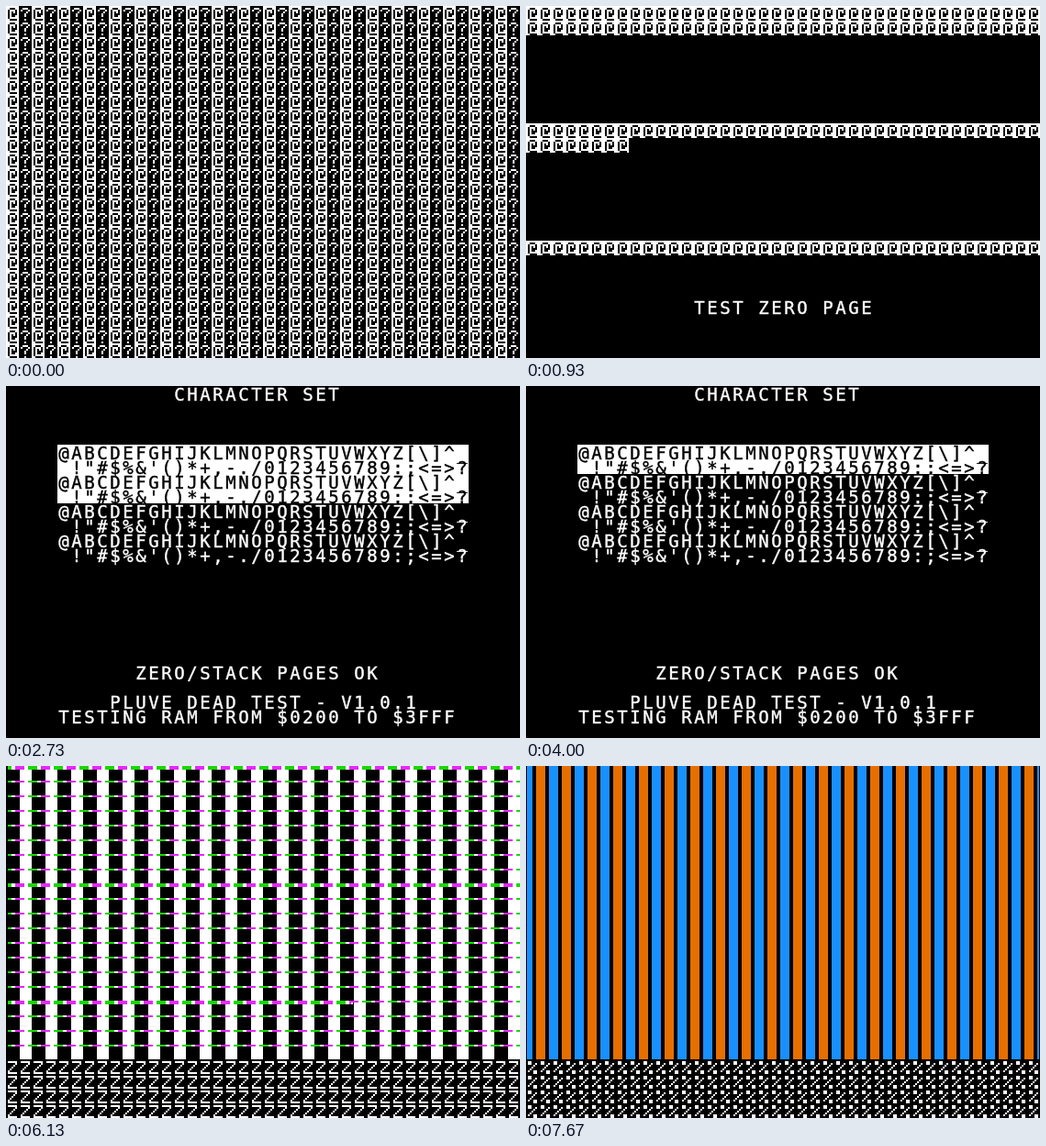
An HTML page with a canvas for the animation above (8000 ms loop, 560 by 384 pixels).

```html
<!DOCTYPE html>
<html lang="en">
<head>
<meta charset="utf-8">
<title>RAM test</title>
<style>
  html, body { margin: 0; width: 100%; height: 100%; overflow: hidden; background: #000; }
  #stage { position: relative; width: 560px; height: 384px; overflow: hidden; background: #000; }
  canvas { position: absolute; left: 0; top: 0; }
  .line {
    position: absolute; box-sizing: border-box; height: 16px;
    padding: 1px 0 0 1.3px;
    font: 19px/16px "DejaVu Sans Mono", monospace;
    letter-spacing: calc(14px - 1ch);
    -webkit-text-stroke: 0.4px currentColor;
    white-space: pre; color: #fff;
  }
  .inv { color: #000; }
</style>
</head>
<body>
<div id="stage"><canvas id="view" width="560" height="384"></canvas></div>
<script>
const LOOP = 8000, TICK = 1000 / 15;
const CHARSET = 15, GRAPHICS = 90;   // ticks at which the screens switch
const stage = document.getElementById('stage');
const ctx = document.getElementById('view').getContext('2d');

// Characters that show up as raw memory, on a 7 x 8 cell
const glyphs = {
  0x00: 'M2 1.5h3M1 2.5h1m3 0h1M1 3.5h1m1 0h1m1 0h1M1 4.5h1m1 0h3M1 5.5h1m1 0h2M1 6.5h1M2 7.5h4',
  0x5A: 'M1 1.5h5M5 2.5h1M4 3.5h1M3 4.5h1M2 5.5h1M1 6.5h1M1 7.5h5',
  0xA5: 'M1 1.5h2M1 2.5h2m2 0h1M4 3.5h1M3 4.5h1M2 5.5h1M1 6.5h1m2 0h2M4 7.5h2',
  0xFF: 'M2 1.5h3M1 2.5h1m3 0h1M4 3.5h1M3 4.5h1M3 5.5h1M3 7.5h1'
};
for (const code in glyphs) glyphs[code] = new Path2D(glyphs[code]);

const lines = [];
function addLine(row, col, text, from, to, style) {
  const el = document.createElement('div');
  el.className = 'line';
  el.textContent = text;
  el.style.left = col * 14 + 'px';
  el.style.top = row * 16 + 'px';
  stage.append(el);
  lines.push({ el, row, col, size: text.length, from, to, style });
}

const chars = (first) => String.fromCharCode(...Array.from({ length: 32 }, (_, i) => first + i));
addLine(20, 13, 'TEST ZERO PAGE', 1, CHARSET);
addLine(0, 13, 'CHARACTER SET', CHARSET, GRAPHICS);
['inverse', 'flash', 'normal', 'normal'].forEach((style, i) => {
  addLine(4 + 2 * i, 4, chars(64), CHARSET, GRAPHICS, style);
  addLine(5 + 2 * i, 4, chars(32), CHARSET, GRAPHICS, style);
});
addLine(19, 10, 'ZERO/STACK PAGES OK', CHARSET, GRAPHICS);
addLine(21, 8, 'PLUVE DEAD TEST - V1.0.1', CHARSET, GRAPHICS + 1);
addLine(22, 4, 'TESTING RAM FROM $0200 TO $3FFF', CHARSET, GRAPHICS + 1);

const flashOn = (tick) => Math.floor((tick + 0.4 - CHARSET) / 3.75) % 2 === 1;
const textAddr = (row, col) => 0x400 + (row % 8) * 128 + (row >> 3) * 40 + col;
const hiresAddr = (y, col) =>
  0x2000 + (y % 8) * 1024 + ((y >> 3) % 8) * 128 + (y >> 6) * 40 + col;

// Two rising write passes over the power-up pattern
function peek(addr, tick) {
  if (addr < 8992 + (tick - 106) * 2667) return 0xA5;
  if (addr < 0x246B + (tick - 92) * 4167) return 0x5A;
  return addr & 1 ? 0xFF : 0;
}

function drawCell(value, row, col, flash) {
  const inverse = value < 0x40 || (value < 0x80 && flash);
  ctx.save();
  ctx.translate(col * 14, row * 16);
  ctx.scale(2, 2);
  ctx.fillStyle = inverse ? '#fff' : '#000';
  ctx.fillRect(0, 0, 7, 8);
  ctx.strokeStyle = inverse ? '#000' : '#fff';
  ctx.stroke(glyphs[value]);
  ctx.restore();
}

function drawText(firstRow, byteAt, flash) {
  for (let row = firstRow; row < 24; row++)
    for (let col = 0; col < 40; col++) {
      const value = byteAt(textAddr(row, col));
      if (value !== null) drawCell(value, row, col, flash);
    }
}

const hues = [['#e628ff', '#19d700'], ['#1990ff', '#e66f00']];

function drawHires(tick) {
  for (let y = 0; y < 160; y++) {
    const bytes = Array.from({ length: 40 }, (_, col) => peek(hiresAddr(y, col), tick));
    const bit = (x) => x < 0 || x > 279 ? 0 : (bytes[Math.floor(x / 7)] >> (x % 7)) & 1;
    for (let x = 0; x < 280; x++) {
      const high = bytes[Math.floor(x / 7)] >> 7;
      const left = bit(x - 1), right = bit(x + 1);
      let color = '#000';
      if (bit(x)) color = left || right ? '#fff' : hues[high][x % 2];
      else if (left && right) color = hues[high][(x + 1) % 2];
      ctx.fillStyle = color;
      ctx.fillRect(2 * x + high, 2 * y, 2, 2);
    }
  }
}

function showLines(tick, flash) {
  for (const { el, row, col, size, from, to, style } of lines) {
    const visible = tick >= from && tick < to;
    const inverse = style === 'inverse' || (style === 'flash' && flash);
    el.style.display = visible ? 'block' : 'none';
    el.classList.toggle('inv', inverse);
    if (visible && inverse) {
      ctx.fillStyle = '#fff';
      ctx.fillRect(col * 14, row * 16, size * 14, 16);
    }
  }
}

function draw(tick) {
  const flash = flashOn(tick);
  ctx.fillStyle = '#000';
  ctx.fillRect(0, 0, 560, 384);
  if (tick === 0) {
    drawText(0, (addr) => addr & 1 ? 0xFF : 0, false);
  } else if (tick < CHARSET) {
    const end = 0x400 + Math.round((tick - 1) * 176 / 13);
    drawText(0, (addr) => addr < end ? 0 : null, false);
  } else if (tick >= GRAPHICS) {
    drawHires(tick);
    if (tick > GRAPHICS) drawText(20, (addr) => peek(addr, tick), flash);
  }
  showLines(tick, flash);
}

let shown = -1;
const start = performance.now();
function frame() {
  const time = (performance.now() - start) % LOOP;
  const tick = Math.floor((time + 5) / TICK) % 120;
  if (tick !== shown) draw(shown = tick);
  requestAnimationFrame(frame);
}
frame();
</script>
</body>
</html>
```
